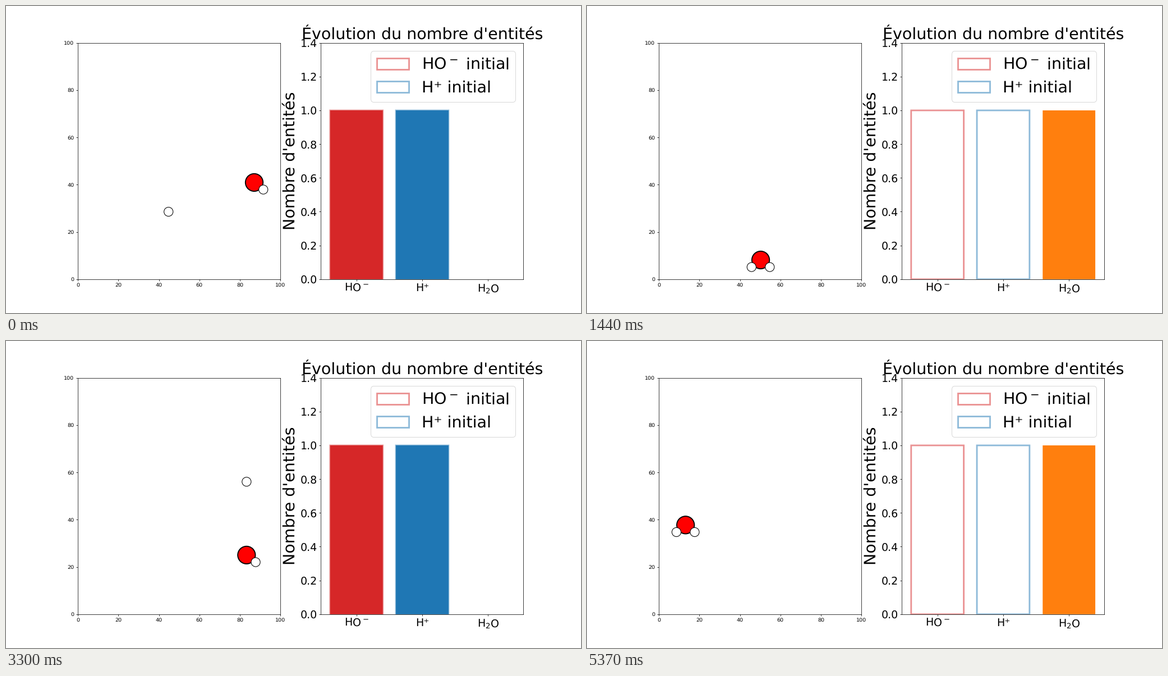
A matplotlib script for the animation above (5400 ms loop, 1025 px wide and 547 px high).

```python
import matplotlib.pyplot as plt
from matplotlib.animation import FuncAnimation

plt.rcParams["font.family"] = "DejaVu Sans"
plt.rcParams["text.hinting"] = "none"

W, H = 1025, 547
DPI = W / 15
RUN = 90          # frames in one run of the reaction
REACT = 26        # frame at which the ions meet
RED, BLUE, ORANGE = "tab:red", "tab:blue", "tab:orange"


def bounce(start, speed, n, low, high):
    """Position after n steps between two walls; a hit costs no extra step."""
    pos, v = start, speed
    for _ in range(n):
        pos += v
        if pos <= low or pos >= high:
            pos = min(max(pos, low), high)
            v = -v
    return pos


def mirror(start, speed, n, turn):
    """Moves for `turn` steps, rests one step, then runs back."""
    return start + speed * (n if n <= turn else 2 * turn + 1 - n)


def hydroxide(n):
    return bounce(87.06, 0.94, n, 0, 94.55), 40.93 - 0.795 * n


def proton(n):
    x = bounce(44.75, -6.16, n, 3.2, 97)
    y = 28.55 + 5.75 * n
    return x, y if y < 99.8 else 199.6 - y


def water(n):
    k = n - 30
    return mirror(72.5, -1.236, k, 53), mirror(17.53, -0.722, k, 15)


fig, (box, chart) = plt.subplots(1, 2, figsize=(W / DPI, H / DPI), dpi=DPI)

box.set_xlim(0, 100)
box.set_ylim(0, 100)
atoms = box.scatter([0] * 3, [0] * 3, s=[33 ** 2, 17 ** 2, 17 ** 2],
                    c=["red", "white", "white"], edgecolors="black",
                    linewidths=[2, 1.1, 1.1], zorder=2)

names = ["HO$^-$", "H⁺", "H$_2$O"]
bars = chart.bar(range(3), [1, 1, 1], color=[RED, BLUE, ORANGE], snap=False)
for i, color in enumerate([RED, BLUE]):
    chart.bar(i, 1, fill=False, edgecolor=color, linewidth=3, alpha=0.5,
              snap=False, label=names[i] + " initial")
chart.set_xlim(-0.54, 2.54)
chart.set_ylim(0, 1.4)
chart.set_xticks(range(3), names)
chart.tick_params(labelsize=20)
chart.set_ylabel("Nombre d'entités", fontsize=30)
chart.set_title("Évolution du nombre d'entités", fontsize=30)
chart.legend(fontsize=30, loc="upper right")


def draw(frame):
    n = frame % RUN
    done = n >= REACT
    x, y = water(n) if done else hydroxide(n)
    free = (x - 4.5, y - 3) if done else proton(n)
    atoms.set_offsets([(x, y), (x + 4.5, y - 3), free])
    for bar, height in zip(bars, (not done, not done, done)):
        bar.set_height(int(height))
    return atoms, *bars


anim = FuncAnimation(fig, draw, frames=2 * RUN, interval=30,
                     repeat=True, repeat_delay=0)
plt.show()
```
